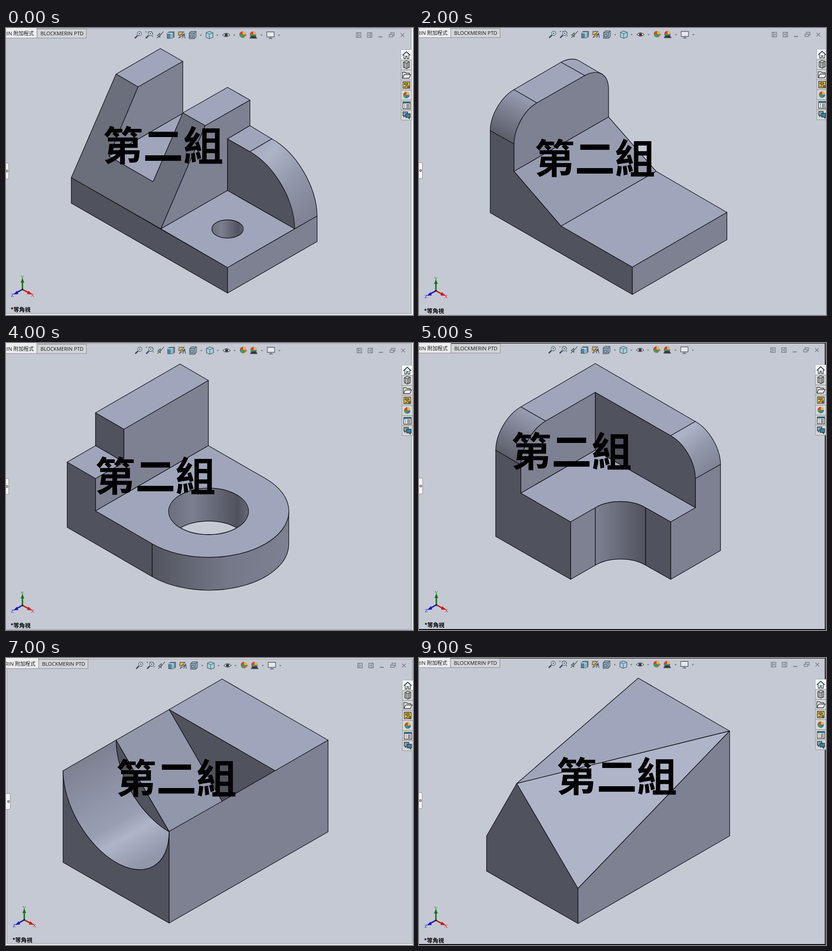
An HTML page for the animation above (10 s loop, 891 by 629 pixels).

```html
<!DOCTYPE html>
<html lang="zh-Hant">
<head>
<meta charset="utf-8">
<title>等角視</title>
<style>
html, body { margin: 0; width: 100%; height: 100%; overflow: hidden; background: #f2f2f2; }
svg { display: block; width: 100vw; height: 100vh; }
text { font-family: "Open Sans", "Noto Sans CJK TC", "Noto Sans CJK JP", sans-serif; }
.frame { fill: #c5c9d3; stroke: #85878c; }
.black { stroke: #000; stroke-width: 2; }
.solid { stroke: #121317; stroke-width: 1.35; stroke-linejoin: round; }
.top { fill: #a1a5bb; }
.right { fill: #7e8192; }
.left { fill: #50535d; }
.slope { fill: #989cb1; }
.label { font: bold 88px "Noto Sans CJK TC", "Noto Sans CJK JP", sans-serif; }
.tab { font-size: 11.2px; fill: #16181c; }
.view { font: bold 12.5px "Noto Sans CJK TC", "Noto Sans CJK JP", sans-serif; }
.axis { font: 11px "Liberation Serif", serif; text-anchor: middle; }
.line { fill: none; stroke: #55595f; stroke-width: 1.3; }
</style>
</head>
<body>
<svg viewBox="0 0 891 629" preserveAspectRatio="none">
<defs>
  <linearGradient id="arcRight" x2=".75" y2="1">
    <stop stop-color="#a1a5bb"/><stop offset=".25" stop-color="#afb3c8"/>
    <stop offset=".6" stop-color="#9296aa"/><stop offset="1" stop-color="#7e8192"/>
  </linearGradient>
  <linearGradient id="arcLeft" x1=".3" y1="1" x2=".75" y2="0">
    <stop stop-color="#555862"/><stop offset=".55" stop-color="#7e8192"/><stop offset="1" stop-color="#a1a5bb"/>
  </linearGradient>
  <linearGradient id="toDark"><stop stop-color="#7e8192"/><stop offset="1" stop-color="#50535d"/></linearGradient>
  <linearGradient id="toLight">
    <stop stop-color="#52555f"/><stop offset=".55" stop-color="#757888"/><stop offset="1" stop-color="#7e8192"/>
  </linearGradient>
  <linearGradient id="bore">
    <stop stop-color="#6b6e7b"/><stop offset=".3" stop-color="#7c7f90"/>
    <stop offset=".86" stop-color="#50535d"/><stop offset="1" stop-color="#666975"/>
  </linearGradient>
  <linearGradient id="groove" gradientUnits="userSpaceOnUse" x1="150" y1="235" x2="280" y2="460">
    <stop stop-color="#7e8192"/><stop offset=".4" stop-color="#9296aa"/><stop offset=".6" stop-color="#9a9eb3"/>
    <stop offset=".74" stop-color="#b0b4c9"/><stop offset="1" stop-color="#9397ab"/>
  </linearGradient>
</defs>

<!-- data-ui: bar offset y, tab edge, toolbar x, window buttons x, side panel x, triad x, triad y -->
<g class="scene" data-ui="0 68 289 772 865 36 573">
  <path class="frame" d="M-2,1H887V626H-2Z"/>
  <g class="solid">
    <path class="left" d="M143,328 485,525V581L143,384Z"/>
    <path class="right" d="M485,525 681,412V468L485,581Z"/>
    <path class="top" d="M339,440 485,356 632,440 485,525Z"/>
    <ellipse cx="485" cy="440.5" rx="34.5" ry="20" fill="url(#bore)"/>
    <path class="right" d="M289,129 387,73V187L225,281Z"/>
    <path class="top" d="M225,281 387,187 322,337Z"/>
    <path class="top" d="M241,101 338,45 387,73 289,129Z"/>
    <path class="right" d="M436,214 534,158V214L485,243V356L339,440Z"/>
    <path class="top" d="M387,186 485,130 534,158 436,214Z"/>
    <path fill="#6b6e7b" d="M143,328 241,101 289,129 225,281 322,337 387,186 436,214 339,440Z"/>
    <path class="left" d="M485,243 534,271C588,302 632,378 632,440L485,356Z"/>
    <path class="top" d="M485,243 534,214 582,243 534,271Z"/>
    <path fill="url(#arcRight)" d="M534,271 582,243C637,274 681,350 681,412L632,440C632,378 588,302 534,271Z"/>
  </g>
  <text class="label" x="212" y="290">第二組</text>
</g>

<g class="scene" data-ui="0 68 290 774 867 36 574">
  <path class="frame" d="M-2,1H888V627H-2Z"/>
  <g class="solid">
    <path class="left" d="M160,170 260,228V343L460,458V573L160,400Z"/>
    <path class="top" d="M160,170 368,50 468,108 260,228Z"/>
    <path class="right" d="M260,228 468,108V223L260,343Z"/>
    <path class="top" d="M260,343 468,223 668,338 460,458Z"/>
    <path class="right" d="M460,458 668,338V453L460,573Z"/>
  </g>
  <text class="label" x="225" y="300">第二組</text>
</g>

<g class="scene" data-ui="-1 69.5 292 778 871 37 576">
  <path class="frame" d="M-2,-2H893V631H-2Z"/>
  <g class="solid">
    <path class="left" d="M156,225 208,254V314L311,434 467,524V584L156,405Z"/>
    <path class="right" d="M467,524 674,404V464L467,584Z"/>
    <path class="top" d="M311,434 519,314 674,404 467,524Z"/>
    <path class="slope" d="M208,314 415,195 519,314 311,434Z"/>
    <path class="right" d="M208,314V254C208,221 230,180 258,164L363,104C392,87 415,101 415,135V195Z"/>
    <path fill="url(#arcLeft)" d="M156,225C156,192 179,152 208,135L258,164C230,180 208,221 208,254Z"/>
    <path class="top" d="M208,135 311,75 363,104 258,164Z"/>
    <path class="top" d="M311,75C322,69 337,65 349,71L400,101C390,95 375,97 363,104Z"/>
  </g>
  <text class="label" x="253" y="318">第二組</text>
</g>

<g class="scene" data-ui="0 69 291 774 867 36 575">
  <path class="frame" d="M-2,1H888V627H-2Z"/>
  <g class="solid">
    <path class="left" d="M150,210 250,268 450,470V570L150,397Z"/>
    <path class="top" d="M150,210 370,83 470,141 250,268Z"/>
    <path class="slope" d="M250,268 470,141 670,343 450,470Z"/>
    <path class="right" d="M450,470 670,343V443L450,570Z"/>
  </g>
  <text class="label" x="225" y="310">第二組</text>
</g>

<g class="scene" data-ui="1 68 290 773.5 867 36 575">
  <path class="frame" d="M-2,1H888V628H-2Z"/>
  <g class="solid">
    <path class="left" d="M134,261 196,297V368L320,440V512L134,404Z"/>
    <path class="right" d="M258,189 443,82V225L196,368V297L258,261Z"/>
    <path class="top" d="M196,153 381,46 443,82 258,189Z"/>
    <path class="left" d="M196,153 258,189V261L196,225Z"/>
    <path class="top" d="M134,261 196,225 258,261 196,297Z"/>
    <path fill="url(#toLight)" d="M320,440A175,101 0 0 0 619,369V441A175,101 0 0 1 320,512Z"/>
    <path class="top" d="M196,368 443,225 568,297A175,101 0 0 1 320,440Z"/>
    <ellipse cx="443.5" cy="369" rx="87.5" ry="51" fill="url(#bore)"/>
    <path fill="#c5c9d3" d="M382,405A87.5,51 0 0 1 505,405A87.5,51 0 0 1 382,405Z"/>
  </g>
  <text class="label" x="195" y="324">第二組</text>
</g>

<g class="scene" data-ui="0 70 291 775 868 38 574">
  <path class="frame black" d="M-2,0H889.5V628H-2Z"/>
  <g class="solid">
    <path class="left" d="M168,235 223,267V329L332,392V518L168,424Z"/>
    <path class="right" d="M660,266 605,297V361L551,392V518L660,455Z"/>
    <path class="right" d="M277,171 386,108V235L223,329V267C223,232 247,189 277,171Z"/>
    <path class="left" d="M386,108 551,203C581,220 605,262 605,297V361L386,235Z"/>
    <path class="top" d="M386,45 605,172 551,203 386,108 277,171 223,140Z"/>
    <path fill="url(#arcLeft)" d="M168,235C168,200 193,157 223,140L277,171C247,189 223,232 223,267Z"/>
    <path fill="url(#arcRight)" d="M551,203 605,172C635,189 660,231 660,266L605,297C605,262 581,220 551,203Z"/>
    <path class="top" d="M223,329 386,235 605,361 551,392 496,361C466,343 416,343 386,361L332,392Z"/>
    <path class="right" d="M332,392 386,361V487L332,518Z"/>
    <path class="left" d="M496,361 551,392V518L496,487Z"/>
    <path fill="url(#toDark)" d="M386,361C416,343 466,343 496,361V487C466,469 416,469 386,487Z"/>
  </g>
  <text class="label" x="202" y="270">第二組</text>
</g>

<g class="scene" data-ui="0 69 291 775 868 37 574">
  <path class="frame" d="M-2,1H889V627H-2Z"/>
  <g class="solid">
    <path class="left" d="M150,330 430,492V582L150,420Z"/>
    <path class="right" d="M430,492 670,353V443L430,582Z"/>
    <path class="top" d="M150,330 390,191 670,353 430,492Z"/>
    <path class="left" d="M270,131 410,212V342L270,261Z"/>
    <path class="right" d="M410,212 530,142V272L410,342Z"/>
    <path class="top" d="M270,131 390,61 530,142 410,212Z"/>
  </g>
  <text class="label" x="225" y="300">第二組</text>
</g>

<g class="scene" data-ui="1 71.5 292 775 868 40 574">
  <path class="frame" d="M2,2H890V626H2Z"/>
  <g class="solid">
    <path class="right" d="M357,380 705,180V381L357,581Z"/>
    <path class="top" d="M357,113 473,46 705,180 589,247Z"/>
    <path class="left" d="M357,113 589,247 473,314Z"/>
    <path fill="#9397ab" d="M241,180 357,113 473,314 357,380Z"/>
    <path class="left" d="M241,180C241,254 293,344 357,381Z"/>
    <path class="left" d="M125,247C125,321 177,411 241,448C305,485 357,455 357,381V581L125,448Z"/>
    <path fill="url(#groove)" d="M125,247C125,321 177,411 241,448C305,485 357,455 357,381C293,344 241,254 241,180Z"/>
  </g>
  <text class="label" x="241" y="296">第二組</text>
</g>

<g class="scene" data-ui="0 68 290 775.5 869 35 576">
  <path class="frame" d="M-2,1H889V631H-2Z"/>
  <g class="solid">
    <path class="left" d="M166,299 441,457V584L166,426Z"/>
    <path class="right" d="M441,457 660,331V458L441,584Z"/>
    <path class="top" d="M166,299C227,334 325,334 386,299L550,394 441,457Z"/>
    <path class="left" d="M386,173 550,394 386,299Z"/>
    <path class="slope" d="M386,173 495,109 660,331 550,394Z"/>
    <path fill="url(#toLight)" d="M166,173C227,208 325,208 386,173V299C325,334 227,334 166,299Z"/>
    <path class="top" d="M166,173 386,46 495,109 386,173C325,208 227,208 166,173Z"/>
  </g>
  <text class="label" x="206" y="332">第二組</text>
</g>

<g class="scene" data-ui="-1 69 291 776 868 37 575">
  <path class="frame black" d="M-2,0H889.5V628H-2Z"/>
  <g class="solid">
    <path class="left" d="M148,390 214,275 348,505V582L148,467Z"/>
    <path class="top" d="M214,275 480,44 680,160Z"/>
    <path fill="#b0b4c9" d="M214,275 680,160 348,505Z"/>
    <path class="right" d="M348,505 680,160V390L348,582Z"/>
  </g>
  <text class="label" x="301" y="292">第二組</text>
</g>

<g id="tabs">
  <path d="M-80,-4H0V22H-80Z" fill="#eeeeef" stroke="#85878c"/>
  <path d="M0,2H108V22H0Z" fill="#d3d4d7" stroke="#85878c"/>
  <text class="tab" x="-7" y="15.5" text-anchor="end">BLOCKMERIN 附加程式</text>
  <text class="tab" x="7.5" y="15.5">BLOCKMERIN PTD</text>
  <rect x="-75" y="296" width="13" height="35" rx="2" fill="#f4f4f4" stroke="#85878c"/>
  <circle cx="-66" cy="313.5" r="2" class="line"/>
</g>

<g id="toolbar" class="line">
  <g id="lens"><path d="M-7,7 -1,1" stroke="#3d4a66" stroke-width="3"/><circle cx="3" cy="-3" r="4.5" fill="#dcecf6"/><path d="M1,-3H5M3,-5V-1"/></g>
  <use href="#lens" x="24"/>
  <path d="M16,-7H32V7" stroke-dasharray="3 3"/>
  <path d="M41,7 49,0 56,-8M42,1 48,-4V5Z" fill="#8eabc0"/>
  <path d="M64,-4 68,-7H79V4L75,7H64Z" fill="#4c87a3"/><path d="M72,-4V7M64,-4H75V7" stroke="#e7f0f5"/>
  <path d="M89,-7H100L94,-1H101L89,7 93,0H88Z" fill="#e4b848"/><path d="M97,7 101,-3 103,7" stroke="#346"/>
  <path d="M112,-4 116,-8H127V4L123,8H112Z" fill="#8fb9cd"/><path d="M112,-4H123V8M123,-4 127,-8M114,0H120V5H114Z"/>
  <path d="M149,-5 156,-8 164,-5V5L156,8 149,5Z" fill="#a8d0df"/><path d="M149,-5 156,-2 164,-5M156,-2V8" stroke="#39788f"/>
  <path d="M185,0Q193,-8 201,0Q193,7 185,0Z" fill="#eceef2"/><circle cx="193" cy="0" r="3" fill="#333"/>
  <g id="ball" stroke="none"><circle cx="229" cy="-1" r="7" fill="#3675bd"/><path d="M229,-1V-8A7,7 0 0 0 222,-1Z" fill="#d94136"/><path d="M229,-1H222A7,7 0 0 0 229,6Z" fill="#42a148"/><path d="M229,-1V-8A7,7 0 0 1 236,-1Z" fill="#e4bb39"/></g>
  <path d="M230,5 237,-1" stroke="#b77927" stroke-width="3"/>
  <use href="#ball" x="23"/><path d="M245,6 248,2H257L260,7H245Z" fill="#333"/>
  <path d="M282,-7H298V4H282Z" fill="#e6e8eb"/><path d="M290,4V7M286,7.5H294"/>
  <path id="caret" d="M135,-1H140L137.500,2Z" fill="#777" stroke="none"/>
  <use href="#caret" x="36"/><use href="#caret" x="73"/><use href="#caret" x="133"/><use href="#caret" x="171"/>
</g>

<g id="window" class="line" style="stroke:#747983">
  <path d="M-5,-5H5V5H-5ZM-2,-5V5M3,-2 0,0 3,2M19,-5H29V5H19ZM26,-5V5M21,-2 24,0 21,2"/>
  <path d="M43,4H52" stroke-width="2"/>
  <path d="M67,-1H75V4H67ZM70,-1V-5H78V1H75M92,-4 100,4M100,-4 92,4"/>
</g>

<g id="side">
  <path d="M0,0H23V154H0Z" fill="#d8d9db" stroke="#8c8e92"/>
  <path d="M0,0H23V22H0Z" fill="#fafafa"/>
  <path class="line" style="stroke:#999" d="M0,22H23M0,44H23M0,66H23M0,88H23M0,110H23M0,132H23"/>
  <g class="line" style="stroke:#333">
    <path d="M3,12 11.500,4 20,12" stroke="#1f4966" stroke-width="2"/><path d="M6,11V19H10V14H13V19H17V11" fill="#e8eef2"/>
    <path d="M5,27 11,24 18,26V38L12,41 5,38ZM5,27 12,29 18,26M12,29V41M8,28V39M15,28V39"/>
    <path d="M3,62V49H9L11,51H18V54M3,62 7,54H21L17,62Z" fill="#eee"/>
    <path d="M4,70H19V84H4Z" fill="#f5cd45"/><path d="M7,73H15V76H7ZM11,76V81M6,81H11M14,79H17V82H14Z"/>
    <use href="#ball" transform="translate(-217.500 100)"/>
    <path d="M4,114H20V129H4Z" fill="#fff"/><path d="M4,116H20" stroke="#27668e" stroke-width="3"/><path d="M7,120H9M11,120H18M7,123H9M11,123H18M7,126H9M11,126H18"/>
    <path d="M4,136H14V144H9L6,147V144H4Z" fill="#72aac5"/><path d="M10,140H20V148H18V151L15,148H10Z" fill="#3686a9"/>
  </g>
</g>

<g id="triad">
  <path d="M0,0V-18" stroke="#147018" stroke-width="3"/><path d="M-4,-15 0,-25 4,-15Z" fill="#147018"/>
  <path d="M0,0 15,8" stroke="#c51b18" stroke-width="3"/><path d="M13,3 22,11 10,10Z" fill="#c51b18"/>
  <path d="M0,0 -13,7" stroke="#1719bb" stroke-width="3"/><path d="M-12,3 -20,11 -9,10Z" fill="#1719bb"/>
  <circle r="2" fill="#222"/>
  <text class="axis" y="-23" fill="#178a1c">Y</text>
  <text class="axis" x="22" y="16" fill="#d22">X</text>
  <text class="axis" x="-22" y="16" fill="#22d">Z</text>
  <text class="view" x="-26" y="49">*等角視</text>
</g>
</svg>
<script>
const SLIDE_MS = 1000;
const scenes = [...document.querySelectorAll('.scene')];
let shown = -1;

function place(id, x, y) {
  document.getElementById(id).setAttribute('transform', `translate(${x} ${y})`);
}

function show(index) {
  scenes.forEach((scene, i) => scene.style.display = i === index ? '' : 'none');
  const [dy, tab, bar, win, side, triadX, triadY] = scenes[index].dataset.ui.split(' ').map(Number);
  place('tabs', tab, dy);
  place('toolbar', bar, 15.5 + dy);
  place('window', win, 15.5 + dy);
  place('side', side, 48 + dy);
  place('triad', triadX, triadY);
  shown = index;
}

function tick() {
  const index = Math.floor(performance.now() / SLIDE_MS) % scenes.length;
  if (index !== shown) show(index);
  requestAnimationFrame(tick);
}
tick();
</script>
</body>
</html>
```
